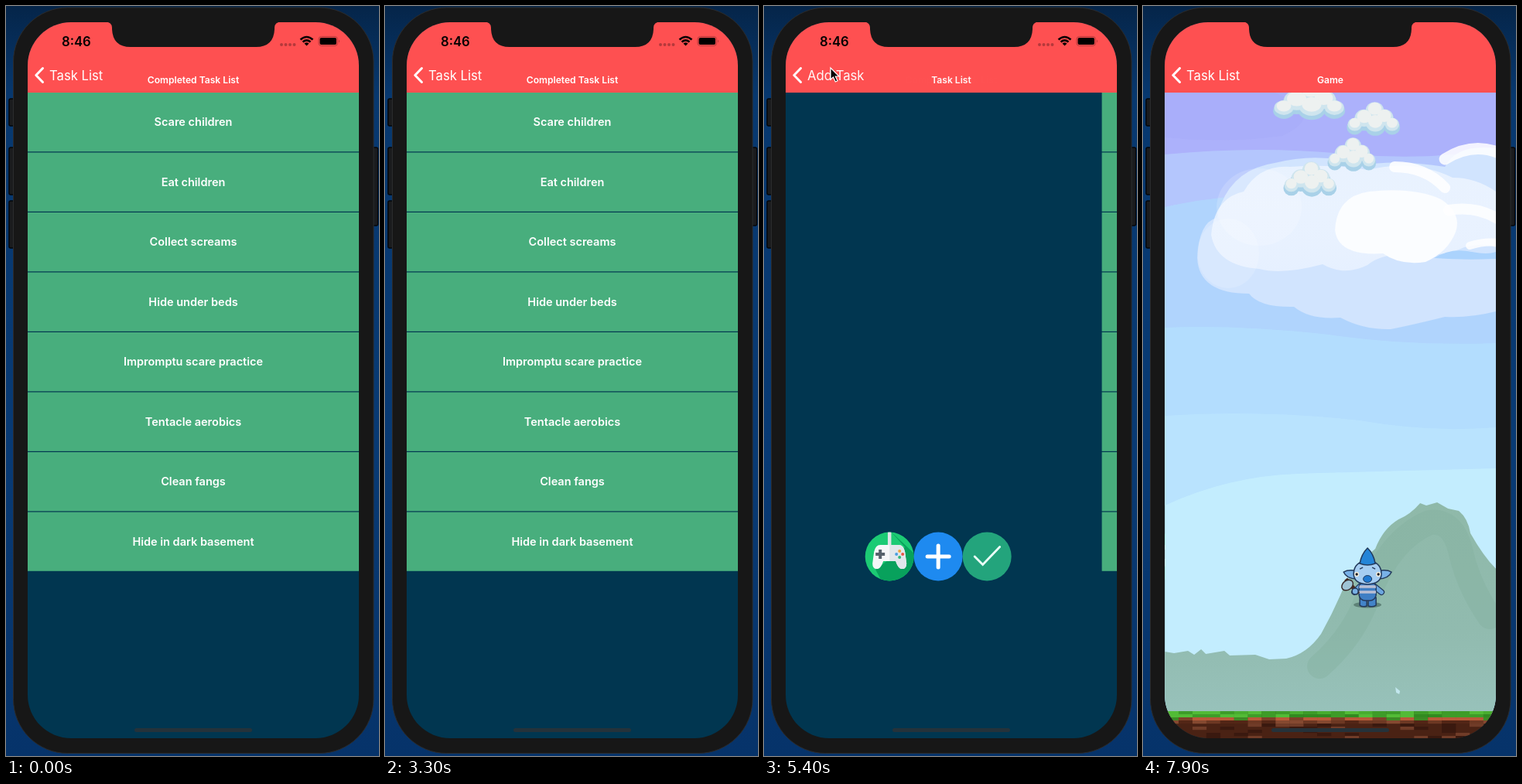
Write an HTML page that moves like this. It is 482x970 px and loops after 8 s.

```html
<!DOCTYPE html>
<html lang="en">
<head>
<meta charset="utf-8">
<title>Task list</title>
<style>
html, body { margin: 0; height: 100%; overflow: hidden; background: #07356b; }
svg { display: block; width: 482px; height: 970px; font-family: Inter, "Open Sans", sans-serif; }
.row, .title { font-weight: 600; fill: #fff; text-anchor: middle; }
.row { font-size: 14.5px; }
.title { font-size: 12.1px; }
.back { font-size: 16.7px; fill: #fff; }
.clock { font-size: 16.7px; font-weight: 600; }
</style>
</head>
<body>
<svg viewBox="0 0 482 970">
<defs>
  <linearGradient id="desk" x2="0" y2="1">
    <stop offset="0" stop-color="#052549"/><stop offset=".12" stop-color="#07386f"/>
    <stop offset=".6" stop-color="#083a74"/><stop offset="1" stop-color="#06336a"/>
  </linearGradient>
  <linearGradient id="haze" x2="0" y2="1">
    <stop offset="0" stop-color="#8fb9a9"/><stop offset=".6" stop-color="#91bbaf"/>
    <stop offset="1" stop-color="#98c2bb"/>
  </linearGradient>
  <linearGradient id="puff" x2="0" y2="1">
    <stop offset="0" stop-color="#f8fbff" stop-opacity=".6"/><stop offset="1" stop-color="#e6f0ff"/>
  </linearGradient>
  <clipPath id="screen"><rect x="28" y="21" width="428" height="926" rx="56"/></clipPath>
  <clipPath id="disc"><circle r="31.5"/></clipPath>
  <clipPath id="torso"><rect x="-11" y="3" width="22" height="25" rx="8"/></clipPath>
</defs>

<rect width="482" height="970" fill="url(#desk)"/>
<g fill="#1b1c1e" stroke="#050608" stroke-width="1.5">
  <rect x="4" y="120" width="9" height="35" rx="2"/>
  <rect x="4" y="183" width="9" height="61" rx="2"/>
  <rect x="4" y="252" width="9" height="61" rx="2"/>
  <rect x="470" y="183" width="10.5" height="101" rx="2"/>
</g>
<rect x="9.5" y="2" width="465.500" height="964.500" rx="70" fill="#171717" stroke="#2b2c2e"/>

<g clip-path="url(#screen)">
  <rect x="28" y="21" width="428" height="926" fill="#013650"/>

  <g id="tasks">
    <g transform="translate(168 712)">
      <circle r="31.5" fill="#1ccb74"/>
      <g clip-path="url(#disc)">
        <path d="M2-32L36 0V36H-8L-18 17L20-12Z" fill="#08a15c"/>
        <path d="M0-32V-10" stroke="#dfe5e8" stroke-width="4.500"/>
      </g>
      <path d="M-12-15H12Q18-15 20-6L22 9Q22 17 15 16Q11 15 8 6H-8Q-11 15-15 16Q-22 17-22 9L-20-6Q-18-15-12-15Z" fill="#f5f7f8"/>
      <path d="M0-15H12Q18-15 20-6L22 9Q22 17 15 16Q11 15 8 6H0Z" fill="#e1e7eb"/>
      <path d="M-12-9V3M-18-3H-6" stroke="#56616b" stroke-width="4"/>
      <circle cx="13" cy="-7" r="2" fill="#f2a43b"/><circle cx="9" cy="-3" r="2" fill="#4b9fe0"/>
      <circle cx="17" cy="-3" r="2" fill="#ea5548"/><circle cx="13" cy="1" r="2" fill="#2fb87a"/>
    </g>
    <circle cx="231" cy="712" r="31.5" fill="#1e8af0"/>
    <path d="M231 698V726M217 712H245" stroke="#fff" stroke-width="5" stroke-linecap="round"/>
    <circle cx="294" cy="712" r="31.5" fill="#23a47c"/>
    <path d="M278 712L288.500 722.500L310.500 699.500" fill="none" stroke="#e9fff7" stroke-width="2.800" stroke-linecap="round"/>
  </g>

  <g id="done"></g>

  <g id="game">
    <path d="M28 112H456V920H28Z" fill="#c3edfe"/>
    <path d="M28 112H456V598Q300 602 200 605Q110 608 28 646Z" fill="#b9e3fe"/>
    <path d="M28 112H456V545Q370 552 280 536Q150 522 28 530Z" fill="#b3ddfe"/>
    <path d="M28 112H456V436Q340 440 240 425Q120 412 28 416Z" fill="#b0d4fd"/>
    <path d="M28 112H456V225Q250 245 150 245Q90 246 28 260Z" fill="#b4c6fd"/>
    <path d="M28 112H456V185Q370 200 270 192Q150 180 28 192Z" fill="#acb1fb"/>
    <path d="M28 112H170Q240 140 180 168Q110 178 28 170Z" fill="#a8adfa" opacity=".7"/>

    <path d="M70 326Q72 280 95 274Q110 212 170 203Q230 188 280 206Q330 198 390 208Q405 178 456 184V395Q420 404 390 402Q350 412 320 418Q285 419 255 403Q215 406 195 389Q150 390 137 372Q72 372 70 326Z" fill="#d1e4fe"/>
    <path d="M88 296Q92 248 130 240Q150 205 190 208Q245 204 290 212Q350 198 400 222Q430 222 456 240V312Q440 306 415 312Q390 324 350 322Q310 318 290 335Q260 350 232 334Q180 348 150 340Q95 336 88 296Z" fill="url(#puff)"/>
    <ellipse cx="150" cy="260" rx="55" ry="50" fill="#fff" opacity=".16"/>
    <ellipse cx="110" cy="320" rx="40" ry="45" fill="#fff" opacity=".14"/>
    <path d="M248 290Q250 246 292 240Q350 234 385 250Q412 268 404 292Q394 318 365 331Q332 336 310 320Q252 324 248 290Z" fill="#fbfdff"/>
    <g fill="none" stroke="#fff" stroke-linecap="round" opacity=".85">
      <path d="M390 198Q425 176 460 190" stroke-width="15"/>
      <path d="M325 208Q365 208 390 235" stroke-width="14"/>
      <path d="M395 264Q430 258 458 275" stroke-width="14"/>
      <path d="M422 310Q440 304 460 306" stroke-width="10"/>
    </g>
    <path d="M376 326Q398 312 425 318Q445 322 456 318V327Q415 329 376 326Z" fill="#abd3fd"/>
    <g id="clouds"></g>

    <path d="M28 835L40 837L58 834L66 839L75 832L81 838L105 834L112 840L145 839L163 845L185 844Q212 838 230 812Q248 780 262 745Q280 718 300 702Q310 676 330 664Q345 658 358 643L366 646L380 642L394 650L408 653Q420 663 423 682Q440 712 456 728V920H28Z" fill="url(#haze)"/>
    <path d="M228 854Q272 815 290 765Q318 690 370 668Q400 664 410 704Q420 750 448 790" fill="none" stroke="#82ae9e" stroke-width="32" stroke-linecap="round" opacity=".4"/>
    <path d="M326 881L332 886L331 890L327 888Z" fill="#c2e7ee"/>
    <g id="ground"></g>

    <g id="hero" stroke="#233a5c" stroke-width="1.500" stroke-linejoin="round">
      <ellipse cy="33.500" rx="18" ry="4" fill="#47685f" opacity=".65" stroke="none"/>
      <path d="M-10 24V34Q-6 37-1 35V27H1V35Q6 37 11 34V24Z" fill="#4384c9"/>
      <path d="M-8 8L-17 17M8 9L18 17" stroke-width="8" stroke-linecap="round"/>
      <path d="M-8 8L-17 17M8 9L18 17" stroke="#6ca6df" stroke-width="5.500" stroke-linecap="round"/>
      <rect x="-11" y="3" width="22" height="25" rx="8" fill="#3f7ec4"/>
      <path d="M-11 10H11M-11 17H11" stroke="#b9bfd4" stroke-width="3.500" clip-path="url(#torso)"/>
      <path d="M-13-10Q-24-13-31-9Q-27 0-14 0ZM13-10Q24-13 31-9Q27 0 14 0Z" fill="#78b1e8"/>
      <path d="M-18-7Q-17-23 0-23Q17-23 18-7Q18 6 0 7Q-18 6-18-7Z" fill="#a5cdf2"/>
      <path d="M-10-20Q-8-32 0-40Q8-32 10-20Q0-16-10-20Z" fill="#2585d8"/>
      <path d="M-10-13L-6-15M6-15L10-13" stroke-width="1.300"/>
      <g stroke="none">
        <circle cx="-14" cy="-6" r="3" fill="#fff3dc"/><circle cx="14" cy="-6" r="3" fill="#fff3dc"/>
        <circle cx="-14" cy="-6" r="1.700" fill="#171c28"/><circle cx="14" cy="-6" r="1.700" fill="#171c28"/>
      </g>
      <ellipse cy="0" rx="5.500" ry="4.500" fill="#1f79d2" stroke-width="1"/>
      <path d="M-28 0L-12 19" stroke="#4a2a20" stroke-width="5"/>
      <ellipse cx="-26" cy="8" rx="8" ry="6" transform="rotate(-38 -26 8)" fill="#9fc4d6" stroke="#3a2b2a"/>
      <circle cx="-16" cy="16" r="4" fill="#79b0e4"/>
    </g>
  </g>

  <path d="M28 21H456V112H28Z" fill="#fe5051"/>
  <g id="headers"></g>
  <g id="status">
    <text class="clock" x="72" y="51.500">8:46</text>
    <g fill="#b5393b">
      <circle cx="356" cy="50" r="2"/><circle cx="361.500" cy="50" r="2"/>
      <circle cx="367" cy="50" r="2"/><circle cx="372.500" cy="50" r="2"/>
    </g>
    <g fill="none" stroke="#0a0203" stroke-width="2.600">
      <path d="M380.500 43.500Q388.500 36.500 396.500 43.500M383.500 46.500Q388.500 42.300 393.500 46.500"/>
    </g>
    <path d="M385.500 48.500Q388.500 46 391.500 48.500L388.500 51.500Z"/>
    <rect x="404" y="39.500" width="24.500" height="12" rx="3.500" fill="none" stroke="#b5393b"/>
    <rect x="405.500" y="41" width="21.500" height="9" rx="2"/>
    <path d="M430 43.500Q432 45.500 430 47.500Z" fill="#b5393b"/>
  </g>
  <rect x="166" y="934" width="152" height="5" rx="2.500" fill="#25323a"/>
</g>

<path d="M128 20Q137 21 137 28V30Q138 53 161 53H323Q346 53 347 30V28Q347 21 356 20Z" fill="#171717"/>
<path id="cursor" d="M0 0V15L3.500 12L6.300 18L9 16.800L6.300 11H11Z" fill="#000" stroke="#fff" stroke-width="1.200"/>
</svg>

<script>
const $ = id => document.getElementById(id);
const W = 428, LOOP = 8000, POP = 5027, PUSH = 7089;

const rect = (x, y, w, h, fill) => `<rect x="${x}" y="${y}" width="${w}" height="${h}" fill="${fill}"/>`;

// Completed tasks
const rows = ["Scare children", "Eat children", "Collect screams", "Hide under beds",
  "Impromptu scare practice", "Tentacle aerobics", "Clean fangs", "Hide in dark basement"];
$("done").innerHTML = rows.map((label, i) => {
  const y = 112 + 77.5 * i;
  return rect(28, y, W, 76.3, "#48ae7d") + `<text class="row" x="242" y="${y + 43.3}">${label}</text>`;
}).join("");

// Navigation headers: back label and title
const headers = [["Task List", "Completed Task List"], ["Add Task", "Task List"], ["Task List", "Game"]];
$("headers").innerHTML = headers.map(([back, title]) => `<g>
  <path d="M47.500 80.500L38.800 89.500L47.500 98.500" fill="none" stroke="#fff" stroke-width="3" stroke-linecap="round" stroke-linejoin="round"/>
  <text class="back" x="56" y="96">${back}</text><text class="title" x="242" y="100.400">${title}</text></g>`).join("");

// Small clouds: centre, width, height
const lobes = [[-.36, .2, .15], [.35, .2, .15], [-.18, .02, .2], [.2, 0, .19], [.02, -.2, .19], [.03, .16, .2]];
$("clouds").innerHTML = [[215, 122, 92, 52], [298, 145, 68, 46], [270, 191, 62, 46], [216, 223, 68, 48]]
  .map(([x, y, w, h]) => {
    const layer = (dy, k, fill) => lobes.map(([lx, ly, r]) =>
      `<ellipse cx="${x + lx * w}" cy="${y + ly * h + dy}" rx="${r * w * k}" ry="${r * h * k * 1.35}" fill="${fill}"/>`).join("");
    return layer(3, 1, "#a9d1e8") + layer(-1, .9, "#cfe5ee") + layer(-3, .68, "#edf1f0");
  }).join("");

// Blocky ground
let seed = 7;
const rand = () => (seed = seed * 16807 % 2147483647) / 2147483647;
const strata = [["#52bb36", "#48ad2f", "#3d9c28"], ["#318a20", "#3d9c28", "#52bb36"],
  ["#7c4128", "#b65a38", "#3d8a25"], ["#6d3823", "#532616", "#854930"]];
let ground = rect(28, 912, W, 36, "#4a2214");
for (let r = 0; r < 9; r++)
  for (let x = 28; x < 456; x += 17.9) {
    const pick = rand();
    if (r < 4) ground += rect(x, 912 + r * 4, 18.2, 4.2, strata[r][pick * 3 | 0]);
    else if (pick < .25) ground += rect(x, 912 + r * 4, 18.2, 4.2, pick < .1 ? "#703c28" : "#3a190f");
  }
$("ground").innerHTML = ground;

// Critically damped slide
const slide = ms => {
  const s = Math.max(0, ms) * .013;
  return 1 - (1 + s) * Math.exp(-s);
};

// Pointer stops: time, x, y
const stops = [[4050, 60, 975], [4450, 88, 76], [4900, 88, 76], [5200, 86, 80], [5500, 86, 80],
  [6250, 173, 717], [6700, 173, 717], [7050, 167, 711], [LOOP, 167, 711]];
function pointer(t) {
  const i = stops.findIndex(s => s[0] > t);
  if (i < 1) return null;
  const [a, b] = [stops[i - 1], stops[i]];
  const u = (t - a[0]) / (b[0] - a[0]), k = u * u * (3 - 2 * u);
  return [a[1] + (b[1] - a[1]) * k, a[2] + (b[2] - a[2]) * k];
}

const move = (id, x, y = 0) => $(id).setAttribute("transform", `translate(${x} ${y})`);
const show = (id, on) => $(id).style.display = on ? "" : "none";

function draw(t) {
  const pop = slide(t - POP), push = slide(t - PUSH);
  move("done", W * pop);
  move("tasks", -.3 * W * (1 - pop + push));
  move("game", W * (1 - push));
  show("tasks", pop > 0);
  show("done", pop < .999);
  show("game", push > 0);

  [(1 - pop) ** 2, pop * (1 - push) ** 2, push]
    .forEach((o, i) => $("headers").children[i].style.opacity = o);
  $("status").style.opacity = Math.min(1, Math.max(0, 1 - (t - PUSH) / 150));

  const fall = Math.max(0, t - PUSH) / 1000;
  move("hero", 261.6 + 35 * fall, 505 + 358 * fall * fall);

  // The game takes the pointer once its screen has settled
  const p = pointer(t);
  show("cursor", p && t < 7700);
  if (p) move("cursor", ...p);
}

const start = performance.now();
function tick() {
  draw((performance.now() - start) % LOOP);
  requestAnimationFrame(tick);
}
tick();
</script>
</body>
</html>
```
